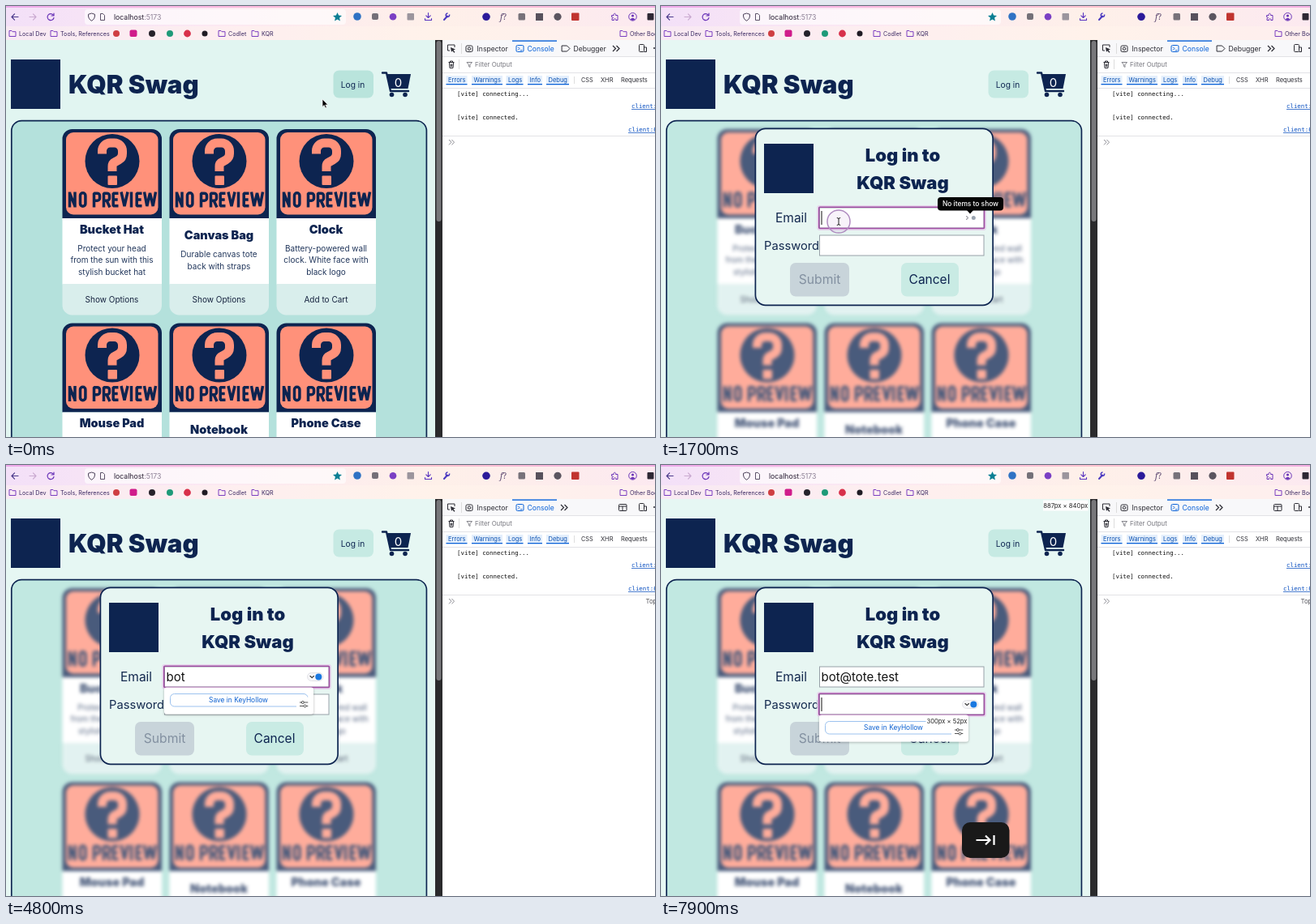
Animation of 800 by 532 pixels, one loop 8000 ms. Source, as an HTML page:

```html
<!DOCTYPE html>
<html lang="en">
<head>
<meta charset="utf-8">
<title>Shop log in</title>
<style>
html, body { margin: 0; width: 100%; height: 100%; overflow: hidden; background: #fff; }
svg { display: block; width: 800px; height: 532px; font-family: Inter, sans-serif; }
text { white-space: pre; }
.mono { font-family: "DejaVu Sans Mono", monospace; }
</style>
</head>
<body>
<svg id="stage" viewBox="0 0 800 532" xmlns="http://www.w3.org/2000/svg"></svg>
<script>
const LOOP = 8000;
const NAVY = '#0d2450', CORAL = '#ff917a', BLUE = '#0a62d8', INK = '#3b2a63';
const SHOP = 'KQR Swag';
const OPEN = 450, FOCUS = 1600, RESIZE = 3400, POPUP = 4000, TAB = 7700;
const EMAIL = 'bot@tote.test';
const KEYS = [3400, 3900, 4200, 4900, 5100, 5300, 5500, 5700, 6800, 6900, 7050, 7200, 7350];

const attrs = o => Object.entries(o).map(([k, v]) => `${k}="${v}"`).join(' ');
const rect = (x, y, width, height, fill, o = {}) =>
  `<rect ${attrs({ x, y, width, height, fill, ...o })}/>`;
const dot = (cx, cy, r, fill, o = {}) => `<circle ${attrs({ cx, cy, r, fill, ...o })}/>`;
const line = (d, stroke, w = 1, o = {}) =>
  `<path ${attrs({ d, stroke, 'stroke-width': w, fill: 'none', ...o })}/>`;
const shape = (d, fill) => `<path d="${d}" fill="${fill}"/>`;
const text = (x, y, str, size, fill = NAVY, o = {}) =>
  `<text ${attrs({ x, y, 'font-size': size, fill, ...o })}>${str}</text>`;
const mid = (x, y, str, size, fill, o = {}) =>
  text(x, y, str, size, fill, { 'text-anchor': 'middle', ...o });
const group = (id, body, o = {}) => `<g ${attrs({ id, ...o })}>${body}</g>`;
const at = (x, y, body) => `<g transform="translate(${x} ${y})">${body}</g>`;
const heavy = { 'font-weight': 900 };
const round = { 'stroke-linecap': 'round', 'stroke-linejoin': 'round' };

function browserBar() {
  const folder = x => line(`M${x - 4} 30.5h3l1 1.2h4v5.8h-8z`, '#7b3fc0', 1, { 'stroke-linejoin': 'round' });
  const mark = (x, str) => folder(x) + text(x + 8, 36.6, str, 7.2, INK);
  return rect(0, 0, 800, 42, 'url(#theme)') + rect(0, 0, 800, 2, 'url(#edge)') +
    rect(0, 25, 800, 17, '#fff6ea', { opacity: .4 }) +
    rect(97, 4, 322, 19, '#fff', { rx: 4, opacity: .65 }) +
    line('M15 13.5H7m3.5-3.7L7 13.5l3.5 3.7', '#4b3a8c', 1.2, round) +
    line('M29 13.5h8m-3.5-3.7l3.5 3.7-3.5 3.7', '#c9a9cf', 1.1, round) +
    line('M58.5 11.5a4 4 0 1 0 .5 3M59 9v3h-3', '#6a35b8', 1.2, round) +
    line('M105.5 9l4 1.3c.2 4-1 6.5-4 8-3-1.5-4.2-4-4-8z', '#4a4058') +
    line('M116.5 9.5h3l2 2v6h-5z', '#4a4058', .9) +
    text(133, 16.5, 'localhost<tspan fill="#8b7f94">:5173</tspan>', 8.7, '#251c30') +
    shape('M408.5 8l1.6 3.6 3.9.4-2.9 2.6.8 3.9-3.4-2-3.4 2 .8-3.9-2.9-2.6 3.9-.4z', '#0a7f94') +
    dot(433, 13, 4.8, '#2f72c4') + rect(451, 9, 8, 8, '#747078', { rx: 2 }) +
    dot(477, 13.3, 4.3, '#7a3fc4') + rect(494.5, 9, 8.5, 8.5, '#9b959d', { rx: 1 }) +
    line('M520.5 8.5v6m-2.7-2.7l2.7 2.7 2.7-2.7M516.5 15.5v2h8v-2', '#5a35c0', 1.1, round) +
    line('M540 17l4-4.5', '#4a38c0', 2, round) + line('M546.5 10.5a2.2 2.2 0 1 1-2-1.5', '#4a38c0', 1.5) +
    dot(592, 13.3, 4.8, '#2b1a9a') +
    text(609, 16.5, '<tspan font-style="italic">f</tspan>?', 10, '#53406b', { 'font-family': 'Noto Serif, serif' }) +
    rect(631.5, 9, 8.5, 8.5, '#77727a', { rx: 1.5 }) + rect(653, 9, 9, 9, '#57515c') +
    dot(680, 13.3, 4.6, '#5b5560') + rect(697, 8.5, 9.5, 9.5, '#c1342f', { rx: 1 }) +
    line('M747 11.5h2.2c-.7-3 3-3 2.3 0h2.5v6h-2.3c.5-2.6-2.7-2.6-2.2 0H747v-2.2c2 .3 2-2 0-1.7z', '#6a35b8', 1, round) +
    dot(772.5, 13.3, 4.8, 'none', { stroke: '#6a35b8' }) + dot(772.5, 12, 1.6, '#6a35b8') +
    shape('M769.5 16.5q3-3.5 6 0l-3 1.5z', '#6a35b8') +
    rect(790.5, 9, 8, 8.5, '#2d2733', { rx: 1 }) +
    mark(8, 'Local Dev') + mark(59, 'Tools, References') +
    dot(136, 34, 4, '#cf3e42') + rect(152.5, 29.5, 9, 8.5, '#d01c8b', { rx: 2 }) +
    dot(180, 34, 4, '#26222b') + dot(202, 34, 4, '#1f9a78') + dot(223.5, 34, 4.4, '#d8304a') +
    dot(245, 34, 3.5, '#201c24') +
    mark(266, 'Codlet') + mark(307, 'KQR') + mark(761, 'Other Bookmarks');
}

// The placeholder picture: lettering and question mark as strokes
function preview() {
  const bowl = x => `M${x} 96.5V79.2h4a3 3 0 0 1 3 3v3a3 3 0 0 1-3 3h-4`;
  const e = x => `M${x + 6.3} 79.2h-6.3v15.6h6.3M${x} 87h5.5`;
  const letters = 'M9 96.5V77.5M9 79L15.5 95M15.5 96.5V77.5' +
    'M22 82a3.2 3.2 0 0 1 6.4 0v10a3.2 3.2 0 0 1-6.4 0z' +
    bowl(39) + bowl(51) + 'M54.5 88L58.5 96.5' + e(62.7) +
    'M72.5 77.5L76.5 95 80.5 77.5M85 77.5v19' + e(91.7) +
    'M101 77.5L104.3 95 108 79 111.7 95 115 77.5';
  return shape('M0 110V12a12 12 0 0 1 12-12h98.5a12 12 0 0 1 12 12v98z', NAVY) +
    rect(4.5, 4, 113.5, 101.5, CORAL, { rx: 9 }) + dot(61.5, 39.5, 33.5, NAVY) +
    line('M49 30.5v-3.5a10 10 0 0 1 10-10h5a10 10 0 0 1 10 10v3a9 9 0 0 1-4.5 8l-4.5 2.5a6 6 0 0 0-3.5 5.5v6', CORAL, 11) +
    rect(56, 57.5, 11.5, 11.5, CORAL, { rx: 1 }) +
    line(letters, NAVY, 3.5, { 'stroke-linejoin': 'bevel', role: 'img', 'aria-label': 'No preview' });
}

function card(x, y, name, desc, action) {
  const drop = desc.length < 3 ? 7.5 : 0;
  return at(x, y, '<use href="#preview"/>' + rect(0, 110, 122.5, 81.5, '#fff') +
    shape('M0 191h122.5v26a12 12 0 0 1-12 12.5H12a12 12 0 0 1-12-12.5z', '#d9eeec') +
    mid(61, 128.5 + drop, name, 14.5, NAVY, heavy) +
    desc.map((s, i) => mid(61, 150.6 + drop + i * 14.5, s, 10, '#22375c')).join('') +
    mid(61, 214.3, action, 10, '#16233f'));
}

function cards() {
  const opt = 'Show Options', add = 'Add to Cart';
  return card(69.5, 152, 'Bucket Hat', ['Protect your head', 'from the sun with this', 'stylish bucket hat'], opt) +
    card(201.5, 152, 'Canvas Bag', ['Durable canvas tote', 'back with straps'], opt) +
    card(333.5, 152, 'Clock', ['Battery-powered wall', 'clock. White face with', 'black logo'], add) +
    card(69.5, 391.5, 'Mouse Pad', ['', '', ''], add) +
    card(201.5, 391.5, 'Notebook', ['', ''], add) +
    card(333.5, 391.5, 'Phone Case', ['', '', ''], opt);
}

function page() {
  return rect(0, 42, 529, 490, '#e1f5f1', { id: 'back' }) +
    rect(6, 66, 61, 61, NAVY) + text(77, 108, SHOP, 31.2, NAVY, heavy) +
    rect(403.5, 79.5, 49.5, 34, '#b9e4dc', { rx: 7, id: 'login' }) + mid(427.5, 100.5, 'Log in', 10.2, NAVY) +
    line('M464 82.5h5l5 22.5h22', NAVY, 2.4, round) + shape('M469 84h30l-3.5 18H473z', NAVY) +
    dot(475.5, 109.5, 2.8, NAVY) + dot(492, 109.5, 2.8, NAVY) + mid(483.5, 100, '0', 15, '#fff') +
    rect(6.8, 141.6, 511.6, 440, '#b4e1dc', { rx: 12.5, stroke: NAVY, 'stroke-width': 1.7, id: 'panel' }) +
    group('cards', cards()) +
    rect(7.7, 142.5, 509.8, 400, '#fff', { rx: 11.5, opacity: .25, id: 'veil' }) +
    rect(529, 42, 9, 490, '#2a2a2c') + rect(530.5, 43, 6, 223, '#77777a', { rx: 3 });
}

function devtools() {
  const filter = (x, w, s) => rect(x - 2.5, 86, w + 5, 11, '#e4effc') +
    rect(x - 2.5, 96, w + 5, 1.3, BLUE) + text(x, 94.4, s, 7.5, '#0a50b0');
  const dark = '#2b2b33', grey = '#76767e';
  const log = (y, s) => text(556, y, s, 7.4, '#111', { class: 'mono' });
  const link = (x, y, s) => text(x, y, s, 7.4, '#0a4fc0', { class: 'mono', 'text-decoration': 'underline' });
  return rect(538, 42, 262, 490, '#fff') + rect(538, 42, 262, 20, '#f8f8fa') +
    line('M538 62.5h262M538 82.5h262M538 101.5h262M538 160.5h262', '#e2e2e6') +
    line('M547 55h-2.5v-7h8.5v3', dark) + shape('M548 51l6 2.5-2.5 1 2 2.5-1.2.8-1.9-2.6-1.4 1.6z', dark) +
    line('M561.5 46v13', '#ddd') +
    rect(567, 49, 8, 7.5, 'none', { rx: 1.5, stroke: dark }) + dot(571, 52.7, 1.7, 'none', { stroke: dark }) +
    text(580.5, 55.5, 'Inspector', 8.6, dark) +
    rect(624, 42.4, 55, 1.4, BLUE) + rect(629, 48.5, 9, 8, 'none', { rx: 1.5, stroke: BLUE }) +
    line('M631 50.5l2 2-2 2m3 .3h2.5', BLUE) + text(642.5, 55.5, 'Console', 8.6, BLUE) +
    group('debugger', line('M685.5 49h6l3.5 3.5-3.5 3.5h-6z', dark, 1, round) + text(699.5, 55.5, 'Debugger', 8.6, dark)) +
    group('more', line('M-4-3.5l3.5 3.5-3.5 3.5M.5-3.5l3.5 3.5-3.5 3.5', dark, 1.2)) +
    group('split', rect(753, 45, 14, 15, '#f8f8fa') + rect(755.5, 48.5, 9.5, 8, 'none', { rx: 1, stroke: dark }) +
      line('M755.5 51h9.5M760 51v5.5', dark)) +
    rect(780.5, 47.5, 6, 9, 'none', { rx: 1, stroke: dark }) + line('M786.5 51h3v5.5h-3', dark) + dot(799, 52, 1, dark) +
    line('M545.5 69.5h7M547.5 69.5V68h3v1.5M546.5 70l.5 6.5h4l.5-6.5M548.3 71.5V75M549.8 71.5V75', dark) +
    line('M558.5 66v12', '#ddd') +
    line('M568 69.5h6.5l-2.5 3v3l-1.5-1v-2z', grey, .9) + text(578, 75.2, 'Filter Output', 7.8, grey) +
    filter(545, 21, 'Errors') + filter(576.5, 33, 'Warnings') + filter(619, 16, 'Logs') +
    filter(645.5, 13, 'Info') + filter(668.5, 23, 'Debug') + line('M700.5 87v9', '#ddd') +
    text(709, 94.4, 'CSS', 7.3, dark) + text(733, 94.4, 'XHR', 7.5, dark) + text(758, 94.4, 'Requests', 7.5, dark) +
    log(111, '[vite] connecting...') + link(771, 126, 'client:495') +
    log(140, '[vite] connected.') + link(767, 155, 'client:618') +
    line('M546 165l3 3.2-3 3.2M549.5 165l3 3.2-3 3.2', '#8d8d94') +
    text(788.5, 171, 'Top', 7.8, '#55555c', { id: 'top' });
}

function popup() {
  const knob = (x, y) => dot(x, y, 1.5, 'none', { stroke: '#444', 'stroke-width': .9 });
  return rect(195, 274.5, 184, 33, '#fff', { rx: 3, filter: 'url(#shade)' }) +
    rect(202.5, 282.5, 169.5, 15.5, '#fff', { rx: 5, stroke: '#9cc2ef' }) +
    mid(286.5, 293.3, 'Save in KeyHollow', 8.4, '#0a5fd0') +
    rect(358, 286.5, 19, 17.5, '#fff', { rx: 4 }) +
    line('M362 293h2.3M367.3 293h5M362 297.5h5M370 297.5h2.3', '#444', .9) +
    knob(365.8, 293) + knob(368.5, 297.5) +
    group('popsize', rect(326.5, 276.5, 51, 10.5, '#fff') + text(327.5, 284.7, '300px × 52px', 7.6, '#222'));
}

function dialog() {
  const field = y => rect(195.5, y, 202.5, 25, '#fff', { stroke: '#97a1a8' });
  return rect(116.4, 151.3, 292.7, 218, '#e7f6f2', { rx: 12.5, stroke: NAVY, 'stroke-width': 1.7 }) +
    rect(127, 170, 61, 61, NAVY) +
    mid(298, 192, 'Log in to', 22, NAVY, heavy) + mid(298, 225.5, SHOP, 22, NAVY, heavy) +
    text(141, 267, 'Email', 15.5, '#14294f') + text(127, 301, 'Password', 14.7, '#14294f') +
    field(249) + field(283) +
    rect(159, 317, 73, 41.5, '#c8d4da', { rx: 7 }) + mid(195.5, 343.3, 'Submit', 15.7, '#8290a0') +
    rect(296, 317, 71, 41.5, '#c9ebe4', { rx: 7 }) + mid(331, 343.3, 'Cancel', 15.5, NAVY) +
    text(197.5, 267, '', 15, '#111', { id: 'email' }) +
    group('focus', rect(193.2, 246.7, 206.8, 29.4, 'none', { rx: 2, stroke: '#e6d2ec', 'stroke-width': 1.6 }) +
      rect(194.7, 248.2, 203.8, 26.4, 'none', { rx: 1, stroke: '#a04aa2', 'stroke-width': 1.5 }) +
      rect(371.5, 256.5, 19.5, 10, '#f6f6f8', { rx: 5, stroke: '#dcdce2', 'stroke-width': .8, id: 'pill' }) +
      line('', '#333', 1.1, { id: 'chevron', ...round }) + dot(385.3, 261.5, 4, '#1a78e0', { id: 'badge' }) +
      rect(197.5, 253, 1, 17, '#111', { id: 'caret' }) +
      group('popup', popup()));
}

const svg = document.getElementById('stage');
const grad = (id, ...stops) => `<linearGradient id="${id}">` +
  stops.map((c, i) => `<stop offset="${i / (stops.length - 1)}" stop-color="${c}"/>`).join('') + '</linearGradient>';
svg.innerHTML = '<defs>' + grad('theme', '#f3e0f8', '#fce9f2', '#fef0e9', '#fce9f0') +
  grad('edge', '#eda9ea', '#f9b6de', '#fcc2cf', '#f2ade2') +
  '<filter id="shade" x="-10%" y="-20%" width="120%" height="160%"><feDropShadow dx="0" dy="1" stdDeviation="1.8" flood-opacity=".3"/></filter>' +
  group('preview', preview()) + '</defs>' +
  page() + devtools() + browserBar() +
  group('dialog', dialog()) +
  group('tip', rect(341, 236, 81, 16.5, '#050505', { rx: 4 }) + shape('M377 252h8l-4 4.5z', '#050505') +
    mid(381.5, 247.3, 'No items to show', 8.4, '#fff', { 'font-weight': 500 })) +
  group('size', rect(471, 43.5, 55.5, 13, '#fdfdfd') + mid(498.7, 53, '887px × 840px', 7.7, '#222')) +
  group('tab', rect(371, 441, 58.5, 44, '#191919', { rx: 10 }) +
    line('M388.5 463h17m-5.5-5.5l5.5 5.5-5.5 5.5M410.5 457v12', '#fff', 2.2)) +
  dot(0, 0, 14, '#c9a6dc', { id: 'ring', 'fill-opacity': .13, stroke: '#b08cc0' }) +
  group('arrow', '<path d="M0 0v9.5l2.2-2 1.5 3.5 1.6-.7-1.5-3.3h3z" fill="#000" stroke="#fff" stroke-width=".7"/>') +
  group('beam', line('M-2.2-4.5q2.2 0 2.2 1.5v6q0 1.5-2.2 1.5M2.2-4.5q-2.2 0-2.2 1.5M0 3q0 1.5 2.2 1.5', '#222'));

const $ = id => document.getElementById(id);
const set = (id, o) => { for (const k in o) $(id).setAttribute(k, o[k]); };
const show = (id, on) => set(id, { display: on ? 'inline' : 'none' });
const move = (id, x, y) => set(id, { transform: `translate(${x} ${y})` });
const within = (t, a, b) => t >= a && t < b;
const ease = (t, a, b) => {
  const u = Math.min(1, Math.max(0, (t - a) / (b - a)));
  return u * u * (3 - 2 * u);
};

function pointer(t) {
  const u = ease(t, 50, 350), v = ease(t, 700, 1500);
  return [390 + 17 * u - 188 * v, 115 - 27 * u + 178 * v];
}

function draw(t) {
  const open = t >= OPEN, tabbed = t >= TAB, wide = t >= RESIZE;
  const [x, y] = pointer(t);

  // Page behind the dialog
  const hover = x > 403 && x < 453 && y > 79 && y < 114;
  set('back', { fill: open ? '#e6f7f3' : '#e1f5f1' });
  set('panel', { fill: open ? '#ace0d7' : '#b4e1dc' });
  set('login', { fill: hover ? '#dbf2ec' : open ? '#c6eae3' : '#b9e4dc' });
  $('cards').style.filter = open ? 'blur(2px)' : 'none';
  show('veil', open);
  show('dialog', open);

  // Email field, focus and caret
  const typed = KEYS.filter(k => t >= k).length;
  $('email').textContent = EMAIL.slice(0, typed);
  show('focus', t >= FOCUS);
  move('focus', 0, tabbed ? 34 : 0);
  const last = tabbed ? TAB : typed ? KEYS[typed - 1] : FOCUS;
  show('caret', (t - last) % 1000 < 500);
  set('caret', { x: 197.5 + (tabbed || !typed ? 0 : $('email').getComputedTextLength() + .5) });
  const popped = t >= POPUP;
  show('pill', typed > 0);
  set('badge', typed ? { r: 4, fill: '#1a78e0' } : { r: 2.5, fill: '#9aa4b0' });
  set('chevron', {
    d: popped ? 'M375 260.5l2.2 2.2 2.2-2.2' : 'M376.5 259.5l2 2-2 2',
    stroke: typed ? '#333' : '#9a9aa2'
  });
  show('popup', popped);
  show('popsize', within(t, POPUP, POPUP + 600) || tabbed);
  show('tip', within(t, FOCUS, 2900));

  // Developer tools resize
  show('size', within(t, RESIZE, 4400) || tabbed);
  show('split', wide);
  show('top', wide);
  show('debugger', !popped);
  move('more', popped ? 688 : wide ? 750 : 752, 52.5);
  show('tab', tabbed);

  // Pointer and click ring
  const seen = t < 2900, field = y > 249 && x < 398;
  show('arrow', seen && !field);
  show('beam', seen && field);
  move('arrow', x, y);
  move('beam', x, y);
  const since = t - (t < 1200 ? 400 : FOCUS);
  show('ring', within(since, 0, 350));
  set('ring', { cx: x, cy: y, r: Math.max(0, 10.5 + since * .035), 'stroke-width': 1.7 - since * .002 });
}

function tick() {
  draw(performance.now() % LOOP);
  requestAnimationFrame(tick);
}
tick();
</script>
</body>
</html>
```
